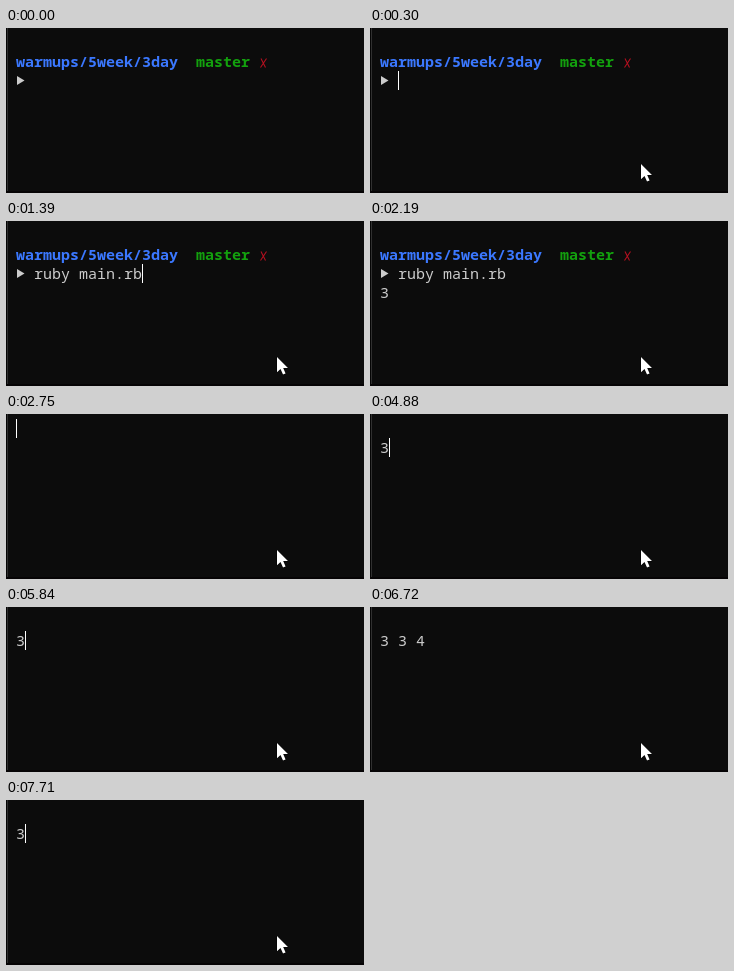
These frames come from a looping animation (358 by 165 pixels, 8 s). An HTML page:

```html
<!DOCTYPE html>
<html lang="en">
<head>
<meta charset="utf-8">
<title>Terminal</title>
<style>
  html, body { margin: 0; width: 100%; height: 100%; overflow: hidden; background: #0c0c0c; }
  #stage { position: relative; width: 358px; height: 165px; overflow: hidden; background: #0c0c0c; }
  #stage > * { position: absolute; }
  #edge { left: 0; top: 0; width: 1px; height: 165px; background: #050505; border-right: 1px solid #303030; }
  #foot { left: 0; top: 163px; width: 358px; height: 2px; background: #060405; }
  .row { left: 10px; height: 19px; white-space: pre; color: #ccc;
         font: 15px/19px "Noto Sans Mono", "DejaVu Sans Mono", monospace; }
  b { font-weight: 700; }
  .path { color: #3b78ff; }
  .branch { color: #13a10e; }
  #caret { width: 1px; height: 19px; background: #fff; }
  svg { left: 0; top: 0; }
</style>
</head>
<body>
<div id="stage">
  <div id="edge"></div>
  <div id="foot"></div>
  <div id="prompt">
    <div class="row" style="position:absolute;top:24px"><b class="path">warmups/5week/3day</b>  <b class="branch">master</b></div>
    <svg width="358" height="165" style="position:absolute">
      <path d="M255 30.5 L259.5 39.5 M260.5 30.5 L254.5 39.5" stroke="#b3101f" stroke-width="1.1" fill="none"/>
      <path d="M11 48 L18.5 52.5 L11 57 Z" fill="#ccc"/>
    </svg>
    <div class="row" id="command" style="position:absolute;left:28px;top:43px"></div>
  </div>
  <div class="row" id="output"></div>
  <div id="caret"></div>
  <svg width="358" height="165">
    <path id="mouse" d="M0 0 V15.2 L3.5 12 L6 17.6 L8.6 16.5 L6.2 11 H11 Z" fill="#fff" stroke="#000" stroke-width="1" paint-order="stroke"/>
  </svg>
</div>
<script>
const LOOP = 8000, CELL = 9, LINE = 19, LEFT = 10, TOP = 5;
const $ = id => document.getElementById(id);
const stage = { prompt: $("prompt"), command: $("command"), output: $("output"), caret: $("caret"), mouse: $("mouse") };

// A caret is [column, row]; a missing caret is in the dark half of its blink.
const shell = (at, caret, command = "", output = "") => ({ at, caret, command, output, row: 3, prompt: true });
const game = (at, caret, output = "") => ({ at, caret, command: "", output, row: 1, prompt: false });

const scenes = [
  shell(0),
  shell(150, [2, 2]),
  shell(680),
  shell(1240, [2, 2]),
  shell(1390, [14, 2], "ruby main.rb"),
  shell(1690, [0, 3], "ruby main.rb"),
  shell(1790, [0, 4], "ruby main.rb", "3"),
  shell(2190, null, "ruby main.rb", "3"),
  game(2750, [0, 0]),
  game(2830, [0, 1]),
  game(3290),
  game(3620, [1, 1], "3"),
  game(3770, [0, 0]),
  game(3850, [0, 2], "3 3"),
  game(4330, null, "3 3"),
  game(4810, [0, 1]),
  game(4880, [1, 1], "3"),
  game(5360),
  game(5440, [0, 1]),
  game(5840, [1, 1], "3"),
  game(6260, [0, 2], "3 3 4"),
  game(6720, null, "3 3 4"),
  game(7290),
  game(7360, [0, 1]),
  game(7710, [1, 1], "3")
];

const mouseSteps = [70, 150, 220, 300];

function drawMouse(t) {
  const step = mouseSteps.filter(at => at <= t).length;
  const left = (1 - step / mouseSteps.length) ** 2;
  stage.mouse.style.display = step ? "" : "none";
  stage.mouse.setAttribute("transform", `translate(${271 - Math.round(18 * left)} ${136 - Math.round(12 * left)})`);
}

function draw(t) {
  const scene = scenes.filter(s => s.at <= t).pop();
  stage.prompt.style.display = scene.prompt ? "" : "none";
  stage.command.textContent = scene.command;
  stage.output.textContent = scene.output;
  stage.output.style.top = TOP + scene.row * LINE + "px";
  stage.caret.style.display = scene.caret ? "" : "none";
  if (scene.caret) {
    const [col, row] = scene.caret;
    stage.caret.style.left = LEFT + col * CELL + "px";
    stage.caret.style.top = TOP + row * LINE + "px";
  }
  drawMouse(t);
}

const start = performance.now();
function tick() {
  draw((performance.now() - start) % LOOP);
  requestAnimationFrame(tick);
}
draw(0);
requestAnimationFrame(tick);
</script>
</body>
</html>
```
